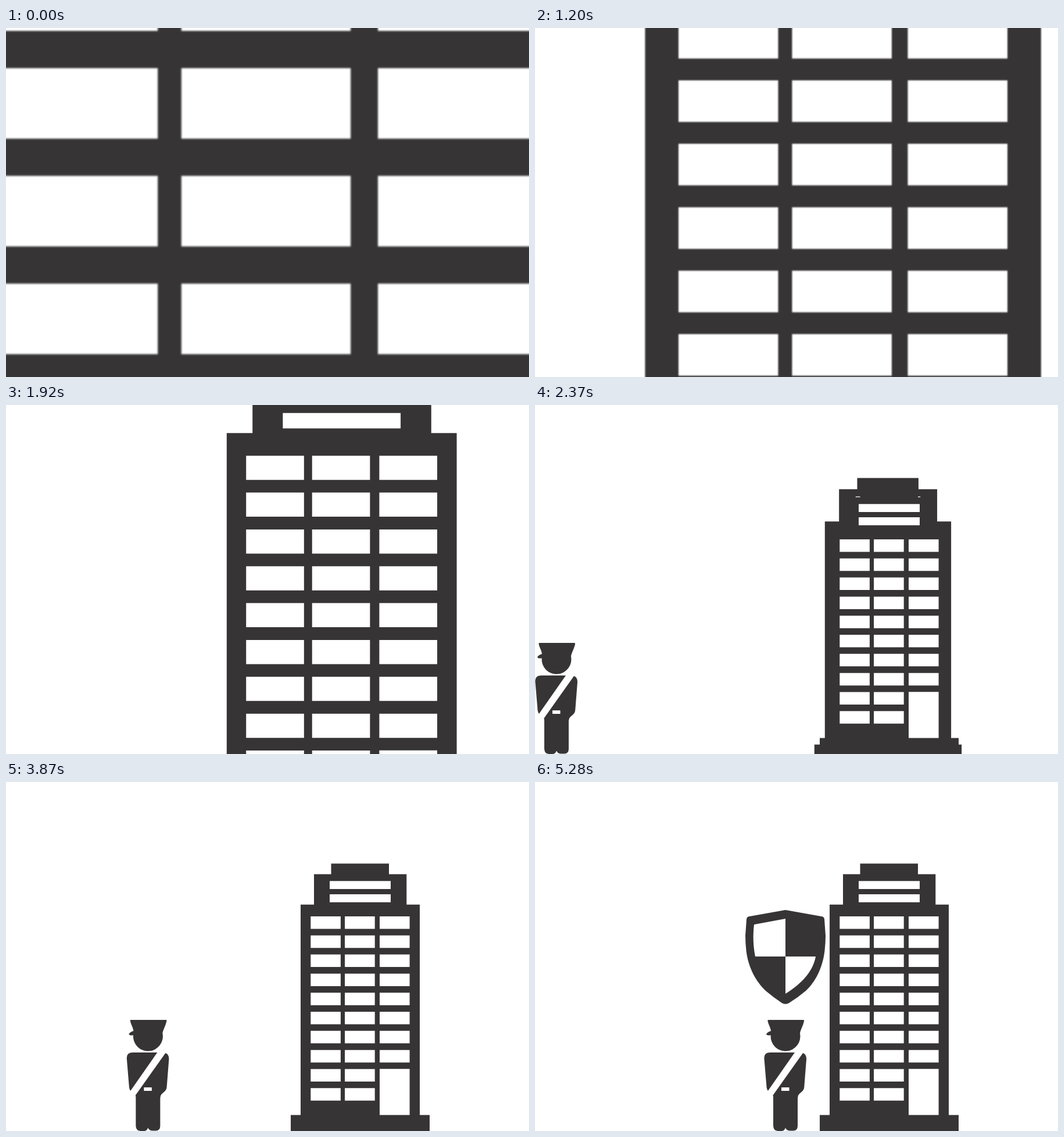
Write an HTML page that moves like this. It is 900 px wide and 600 px high and loops after 7.68 s.

```html
<!DOCTYPE html>
<html lang="en">
<head>
<meta charset="utf-8">
<title>Guarded tower</title>
<style>
  html, body { margin: 0; width: 100%; height: 100%; overflow: hidden; background: #fff; }
  svg { display: block; width: 100vw; height: 100vh; }
</style>
</head>
<body>
<svg viewBox="0 0 900 600" fill="#373435">
  <defs>
    <filter id="soft" x="-5%" y="-5%" width="110%" height="110%" color-interpolation-filters="sRGB">
      <feGaussianBlur stdDeviation="0.25"/>
    </filter>
    <g id="tower">
      <path d="M559.5 140.3H659V158.5H689.3V210.8H712V572.5H729V600H490V572.5H507V210.8H530V158.5H559.5Z"/>
      <path id="panes" fill="#fff"/>
    </g>
  </defs>

  <g id="zoom"><use href="#tower" filter="url(#soft)"/></g>
  <use id="still" href="#tower"/>

  <g id="guard">
    <path d="M400.4 410.5Q400 409 401.6 409H462Q463.5 409 463 411C461 420 456.5 427 456 432
             A25.5 25.5 0 1 1 405.6 435.3C402 436 398.5 435.5 398 433.5Q400 429.5 406 428
             C405.5 422 401.5 417 400.4 410.5Z"/>
    <path d="M447 465H405Q394 465 394.4 475L398.5 524Q399 529 401 530.8Z"/>
    <path d="M461 466Q467.5 468 467 477L463.3 524Q463 529.5 458.5 533L454.5 536.5Q452 539 452 543V591
             Q452 599.5 444.5 599.5H439Q433 599.5 431 594.5Q429 600 424 600H418Q410.3 599.5 410 591V542
             L409.5 538.5Z"/>
    <path fill="#fff" d="M424 525H437.5V531H424Z"/>
  </g>

  <g id="shield">
    <path d="M431 220L494 231.3Q497.5 232 498 236L500 264Q500 276 498.5 290C495 320 482 344 466 359
             Q453 370 437 380Q431 383.5 425 380Q410 370 397 359C381 344 367 320 363.5 290
             Q362 276 362 264L364 236Q364.5 232 368 231.3Z"/>
    <path fill="#fff" d="M377 245L431 235V300H379C375 280 375 262 377 245Z
                         M431 300H483C479 323 462 345 431 364Z"/>
  </g>
</svg>
<script>
  const LOOP = 7680, TICK = 30;
  const ENTER = 79;           // tick at which the guard walks in
  const SHIELD = 175;
  const PIVOT = { x: 643.65, y: 385.5 };
  const WALK = 394, STEP = WALK / 95;

  const el = id => document.getElementById(id);
  const rect = (x, y, w, h) => `M${x} ${y}h${w}v${h}h${-w}Z`;
  const show = (id, on) => el(id).setAttribute('visibility', on ? 'visible' : 'hidden');

  function buildPanes() {
    let d = rect(557, 170.2, 105, 13.8) + rect(557, 193, 105, 13.7);
    for (let row = 0; row < 10; row++) {
      const columns = row < 8 ? [524.3, 583.1, 643] : [524.3, 583.1];
      for (const x of columns) d += rect(x, 231 + row * 32.81, 51.6, 21.5);
    }
    d += rect(643, 493.3, 51.6, 79.2);
    el('panes').setAttribute('d', d);
  }

  function draw(time) {
    const n = Math.floor((time % LOOP) / TICK);
    const scale = 5.646 - 0.05805 * n;

    // The zoomed tower stays one tick beneath the settled one.
    show('zoom', n <= ENTER);
    if (n <= ENTER) {
      el('zoom').setAttribute('transform',
        `translate(${PIVOT.x} ${PIVOT.y}) scale(${scale}) translate(${-PIVOT.x} ${-PIVOT.y})`);
    }
    show('still', n >= ENTER);
    show('guard', n >= ENTER);
    const walked = Math.max(0, Math.min(WALK, (n - ENTER) * STEP));
    el('guard').setAttribute('transform', `translate(${walked - WALK} 0)`);
    show('shield', n >= SHIELD);
  }

  buildPanes();
  const start = performance.now();
  function loop() {
    draw(performance.now() - start);
    requestAnimationFrame(loop);
  }
  loop();
</script>
</body>
</html>
```
